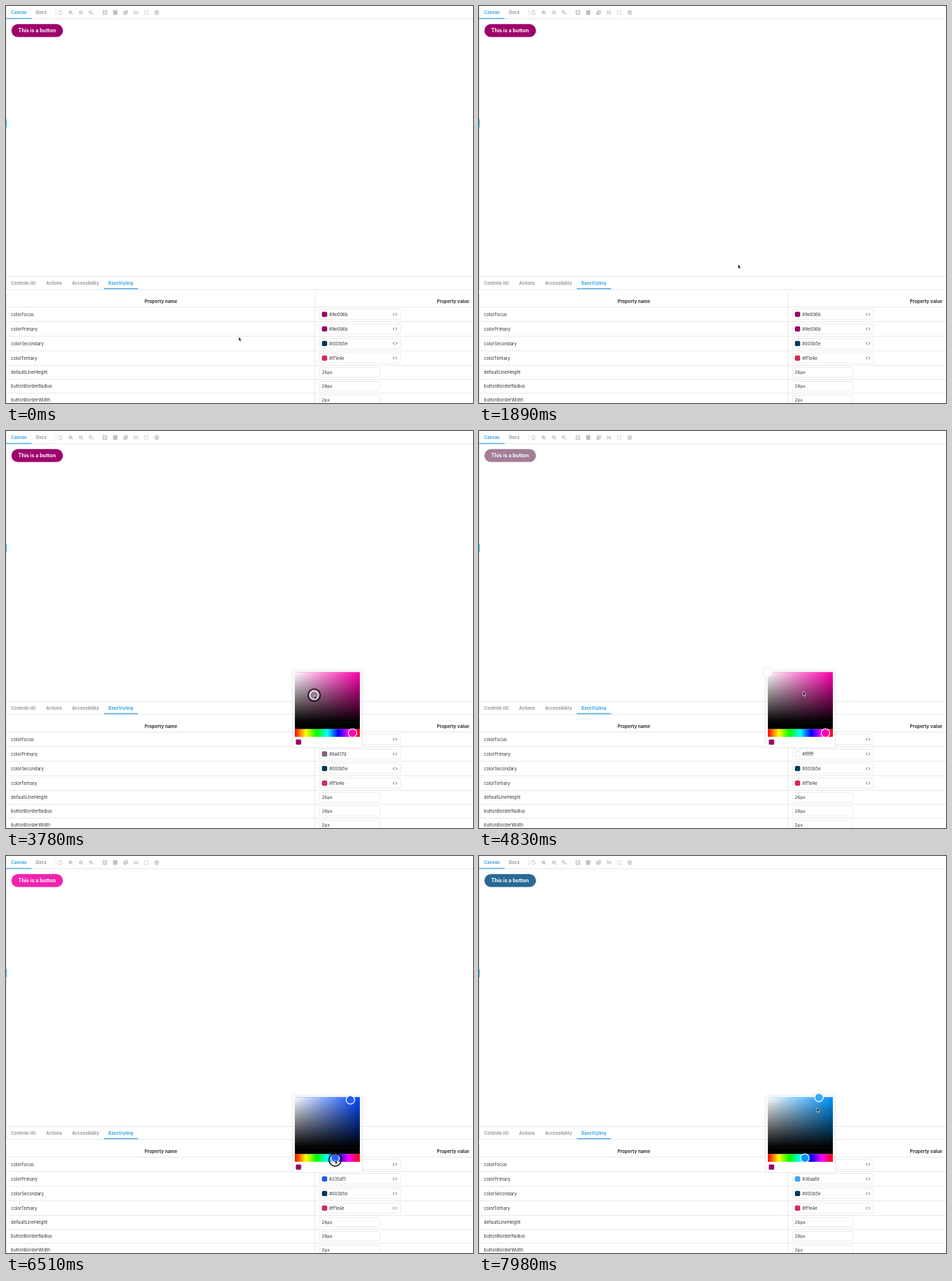
Write an HTML page that moves like this. It is 640 px wide and 544 px high and loops after 8000 ms.

```html
<!DOCTYPE html>
<html lang="en">
<head>
<meta charset="utf-8">
<title>Base styling panel</title>
<style>
html, body { margin: 0; width: 100%; height: 100%; overflow: hidden; background: #fff; }
svg { display: block; width: 100%; height: 100%; }
text { font-family: Inter, "Open Sans", sans-serif; font-size: 5.85px; fill: #333; }
.tab { font-weight: 700; fill: #999; }
.on { fill: #3ea9e5; }
.head { font-size: 6.2px; font-weight: 700; text-anchor: middle; }
.name { font-size: 6px; }
.mono { font-family: "DejaVu Sans Mono", "Noto Sans Mono", monospace; font-size: 6.1px; }
.label { font-size: 6.95px; font-weight: 700; fill: #fff; text-anchor: middle; }
.line { stroke: #e9e9e9; fill: none; }
.field { stroke: #e9e9e9; stroke-width: .8; fill: #fff; }
.swatch { stroke: #000; stroke-opacity: .2; stroke-width: .5; }
.icon { stroke: #a4a4a4; stroke-width: .75; fill: none; }
.thumb { stroke: #fff; stroke-width: 1.2; }
#popup { filter: drop-shadow(0 0 2.2px rgba(0,0,0,.07)) drop-shadow(0 .5px 1.3px rgba(0,0,0,.12)); }
</style>
</head>
<body>
<svg viewBox="0 0 640 544" preserveAspectRatio="none">
  <defs>
    <linearGradient id="toWhite"><stop stop-color="#fff"/><stop offset="1" stop-color="#fff" stop-opacity="0"/></linearGradient>
    <linearGradient id="toBlack" x2="0" y2="1"><stop stop-opacity="0"/><stop offset="1"/></linearGradient>
    <linearGradient id="rainbow"></linearGradient>
  </defs>
  <rect width="640" height="544" fill="#fff"/>
  <path class="line" d="M0 17.5H640M0 370.5H640M0 388.5H640M.5 0V388M68.5 4.5V13.5"/>
  <rect x="-1" y="155" width="2.2" height="11.4" rx="1" fill="#35c8f4"/>
  <path d="M0 17.2H35M134 387.4H181" stroke="#3ea9e5" stroke-width="1.33"/>
  <g id="tabs"></g>
  <g id="icons" class="icon"></g>

  <rect id="button" x="7.4" y="24.8" width="70.7" height="17.7" rx="8.85"/>
  <text class="label" x="42.6" y="36">This is a button</text>

  <text class="head" x="212.3" y="406.5">Property name</text>
  <text class="head" x="612.8" y="406.5">Property value</text>
  <path class="line" d="M.5 394V544M423.5 394V544M0 412.5H640"/>
  <g id="rows"></g>

  <g id="popup">
    <path d="M395 328.5H486Q487.6 328.5 487.6 330V431.4Q487.6 433 486 433H440.4L437 436.4 433.6 433H395Q393.4 433 393.4 431.4V330Q393.4 328.5 395 328.5Z" fill="#fff"/>
    <g transform="translate(395.9 330.3)">
      <rect id="hueFill" width="89" height="69"/>
      <rect width="89" height="69" fill="url(#toWhite)"/>
      <rect width="89" height="69" fill="url(#toBlack)"/>
      <rect y="68.8" width="89" height="9.5"/>
      <rect y="78.2" width="89" height="10.6" fill="url(#rainbow)"/>
    </g>
    <rect class="swatch" x="397.3" y="422.7" width="7.1" height="7.1" rx="1.4" fill="#9e006b"/>
    <circle id="hueThumb" class="thumb" cy="413.8" r="5.8"/>
    <circle id="colorThumb" class="thumb" r="5.8"/>
  </g>

  <circle id="press" r="8.4" fill="#fff" fill-opacity=".15" stroke="#111" stroke-width="1.5"/>
  <path id="cursor" d="M0 0V5.8L1.3 4.6 2.2 6.7 3.2 6.3 2.3 4.2H4.1Z" stroke="#fff" stroke-width=".6"/>
</svg>
<script>
const STEP = 70, LOOP = 8000, OPEN = 2730;
const BOX = { x: 395.9, y: 330.3, w: 89, h: 69 };
const $ = id => document.getElementById(id);
const set = (el, attrs) => { for (const k in attrs) el.setAttribute(k, attrs[k]); };

const tab = (x, y, name, on = '') => `<text class="tab ${on}" x="${x}" y="${y}">${name}</text>`;
$('tabs').innerHTML = tab(7, 11.1, 'Canvas', 'on') + tab(41, 11.1, 'Docs') +
  tab(7, 382.1, 'Controls (6)') + tab(55, 382.1, 'Actions') +
  tab(90.5, 382.1, 'Accessibility') + tab(140.3, 382.1, 'BaseStyling', 'on');

// Property table
const nameCell = (name, y) => `<text class="name" x="6.8" y="${y + 2}">${name}</text>`;
const colorRow = (name, hex, y) => nameCell(name, y) +
  `<path class="line" d="M0 ${y + 10}H640"/>
  <rect class="field" x="429.5" y="${y - 7}" width="111" height="14" rx="2"/>
  <rect id="${name}" class="swatch" x="433" y="${y - 3.6}" width="7.1" height="7.1" rx="1.8" fill="${hex}"/>
  <text id="${name}Hex" x="443" y="${y + 2}">${hex}</text>
  <path d="M532.2 ${y - 1.8}l-1.9 1.8 1.9 1.8m1.6 -3.6l1.9 1.8 -1.9 1.8" fill="none" stroke="#555" stroke-width=".8"/>`;
const sizeRow = (name, value, y) => nameCell(name, y) +
  `<path class="line" d="M0 ${y + 9.5}H640"/>
  <rect class="field" x="429.5" y="${y - 6.5}" width="83" height="13" rx="2"/>
  <text class="mono" x="432.8" y="${y + 2.2}">${value}</text>`;
const colors = { colorFocus: '#9e006b', colorPrimary: '#9e006b', colorSecondary: '#003b5e', colorTertiary: '#ff1e4e' };
const sizes = { defaultLineHeight: '26px', buttonBorderRadius: '20px', buttonBorderWidth: '2px' };
$('rows').innerHTML =
  Object.entries(colors).map(([name, hex], i) => colorRow(name, hex, 422.5 + 20 * i)).join('') +
  Object.entries(sizes).map(([name, px], i) => sizeRow(name, px, 502 + 19 * i)).join('');
set($('colorTertiary'), { fill: '#dc2855' });

// Toolbar icons, about 14 px apart in two groups
const circle = (r, more = '') => `<circle r="${r}" ${more}/>`;
const square = more => `<rect x="-2.4" y="-2.4" width="4.8" height="4.8" ${more || ''}/>`;
const path = d => `<path d="${d}"/>`;
const lens = circle(2, 'cx="-.4" cy="-.4"') + path('M1.1 1.2L2.8 2.9M-1.5 -.4H.7');
const icons = [
  circle(2.5, 'stroke-dasharray="6.4 1.45"'),
  lens + path('M-.4 -1.5V.7'),
  lens,
  circle(2, 'cx="-.4" cy="-.4" stroke-dasharray="10 2.5"') + path('M1.1 1.2L2.8 2.9M-2.6 -2.6V-.8H-.8'),
  square() + path('M-2.4 1.4L-.8 -.2 .4 .9 1.3 .1 2.5 1.2'),
  square() + path('M-2.4 -.8H2.4M-2.4 .8H2.4M-.8 -2.4V2.4M.8 -2.4V2.4'),
  path('M-1.2 -2.4H2.6V1.2H-1.2ZM-2.4 -1.2V2.4H1.2M-.2 -1H1.6M-.2 0H1.6'),
  path('M-2.6 -2.4V-1H2.6V-2.4M-2.6 2.4V1H2.6V2.4'),
  square('stroke-dasharray="1.2"'),
  circle(2.8) + path('M-1.5 -.7H1.5M0 -1.6V.5M-.9 1.8L0 .3 .9 1.8')
];
$('icons').innerHTML = icons.map((art, i) =>
  `<g transform="translate(${74.5 + 14.2 * i + (i > 3 ? 4.2 : 0)} 9)">${art}</g>`).join('');
$('rainbow').innerHTML = Array.from({ length: 7 }, (_, i) =>
  `<stop offset="${i / 6}" stop-color="hsl(${i * 60},100%,50%)"/>`).join('');

// Stops of the pointer. Two stops of one kind other than "move" form a press or drag.
const move = (t, x, y) => ({ t, x, y, kind: 'move' });
const click = (t, x, y) => ({ t, x, y, kind: 'click' });
const color = (t, s, v) => ({ t, x: BOX.x + BOX.w * s, y: BOX.y + BOX.h * (1 - v), kind: 'color', pick: { s, v } });
const hue = (t, h) => ({ t, x: BOX.x + BOX.w * h / 360, y: 416.5, kind: 'hue', pick: { h } });
const first = { h: 319.37, s: 1, v: .62 };
const stops = [
  move(0, 319, 453.5), move(1890, 355, 354),
  click(2590, 437, 442), click(OPEN, 437, 442),
  color(3360, .8, .49), color(3780, .2971, .5412), color(3990, .22, .635), color(4480, 0, 1),
  move(4830, 444, 357),
  color(5180, .8548, .9451), color(5320, .8548, .9451),
  hue(5670, first.h), hue(5950, 279.03), hue(6510, 223.1), hue(6790, 205.03),
  color(7140, .67, .52), color(7420, .72, .59), color(7700, .7866, .9922),
  move(7980, 463, 345)
];
// Moments at which the button takes over the picked colour
const commits = [0, 3990, 5320, 6930, 7420];

const mix = (a, b, p) => a + (b - a) * p;
const smooth = p => p * p * (3 - 2 * p);

function stateAt(t) {
  const i = Math.max(1, stops.findIndex(s => s.t >= t));
  const a = stops[i - 1], b = stops[i];
  const pressed = a.kind === b.kind && a.kind !== 'move';
  const p = (t - a.t) / (b.t - a.t), q = pressed ? p : smooth(p);
  const state = Object.assign({}, first, ...stops.filter(s => s.t <= t).map(s => s.pick));
  if (pressed) for (const k in a.pick) state[k] = mix(a.pick[k], b.pick[k], p);
  return { ...state, pressed, x: mix(a.x, b.x, q), y: mix(a.y, b.y, q) };
}

function hex({ h, s, v }) {
  const channel = n => {
    const k = (n + h / 60) % 6;
    const c = v - v * s * Math.max(0, Math.min(k, 4 - k, 1));
    return Math.round(c * 255).toString(16).padStart(2, '0');
  };
  return '#' + channel(5) + channel(3) + channel(1);
}

function draw(time) {
  const t = Math.floor(time / STEP) * STEP;
  const now = stateAt(t), picked = hex(now), pure = hex({ h: now.h, s: 1, v: 1 });
  const thumb = color(t, now.s, now.v);

  set($('cursor'), { transform: `translate(${now.x} ${now.y})` });
  set($('press'), { cx: now.x, cy: now.y, visibility: now.pressed ? 'visible' : 'hidden' });
  set($('popup'), { visibility: t >= OPEN ? 'visible' : 'hidden' });
  set($('hueFill'), { fill: pure });
  set($('hueThumb'), { cx: hue(t, now.h).x, fill: pure });
  set($('colorThumb'), { cx: thumb.x, cy: thumb.y, fill: picked });
  set($('colorPrimary'), { fill: picked });
  $('colorPrimaryHex').textContent = picked;
  set($('button'), { fill: hex(stateAt(commits.filter(c => c <= t).pop())) });
}

const start = performance.now();
function tick() {
  draw((performance.now() - start) % LOOP);
  requestAnimationFrame(tick);
}
tick();
</script>
</body>
</html>
```
